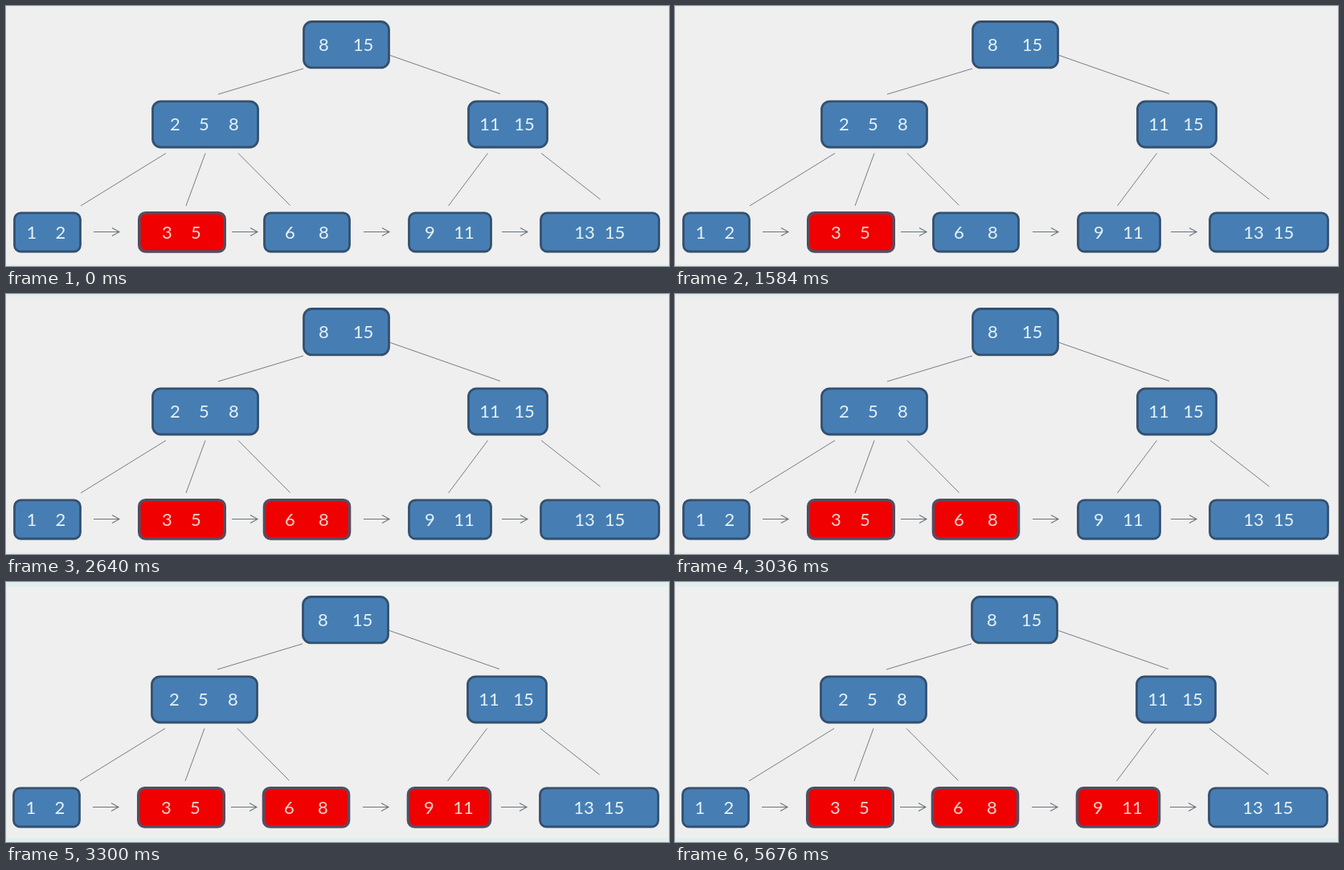
These frames come from a looping animation (825x324 px, 7.26 s). An HTML page:

```html
<!DOCTYPE html>
<html lang="en">
<head>
<meta charset="utf-8">
<title>B+ tree range scan</title>
<style>
  html, body { margin: 0; width: 100%; height: 100%; overflow: hidden; background: #e0eeee; }
  svg { display: block; width: 825px; height: 324px; }
  .paper, .tree, .scan2 rect, .scan2 text, .scan3 rect, .scan3 text {
    animation: 7260ms step-end infinite;
  }
  .paper { fill: #efefef; animation-name: paper; }
  .tree { animation-name: drift; }
  .node rect { fill: #467eb4; stroke: #34506f; stroke-width: 2.8px; }
  .node text { fill: #e6f2f5; font: 22px Lato, "Open Sans", sans-serif; text-anchor: middle; }
  .scan1 rect { fill: #f00000; stroke: #554d61; stroke-width: 3.6px; }
  .scan1 text { fill: #f3d6d0; }
  .scan2 rect { animation-name: boxEarly; }
  .scan2 text { animation-name: textEarly; }
  .scan3 rect { animation-name: boxLate; }
  .scan3 text { animation-name: textLate; }
  .links { fill: none; stroke: #757e83; stroke-width: 1px; }
  .arrows { fill: none; stroke: #69757e; stroke-width: 1.1px; }

  /* the scan advances at 2640 ms and 3300 ms */
  @keyframes drift {
    0% { transform: translate(0, 0); }
    36.36% { transform: translate(0, -1px); }
    45.45%, 100% { transform: translate(-1px, -1px); }
  }
  @keyframes paper {
    0% { clip-path: inset(1px 0 2px 0); }
    36.36% { clip-path: inset(3px 0 2px 0); }
    45.45%, 100% { clip-path: inset(6px 1px 5px 1px); }
  }
  @keyframes boxEarly { 36.36%, 100% { fill: #f00000; stroke: #554d61; stroke-width: 3.6px; } }
  @keyframes textEarly { 36.36%, 100% { fill: #f3d6d0; } }
  @keyframes boxLate { 45.45%, 100% { fill: #f00000; stroke: #554d61; stroke-width: 3.6px; } }
  @keyframes textLate { 45.45%, 100% { fill: #f3d6d0; } }
</style>
</head>
<body>
<svg viewBox="0 0 825 324">
  <rect class="paper" width="825" height="324"/>
  <g class="tree">
    <path class="links" d="M370 78L264 110M478 61.5L615 109.5M199 183.5L93 249M248 183.5L224 249M289 183.5L353.5 248.5M599.5 183.5L550.5 249M666 183.5L739.5 241"/>
    <g class="arrows" id="arrows"></g>
    <g id="nodes"></g>
  </g>
</svg>
<script>
  const make = (parent, name, attrs, text = "") => {
    const el = document.createElementNS("http://www.w3.org/2000/svg", name);
    for (const key in attrs) el.setAttribute(key, attrs[key]);
    el.textContent = text;
    return parent.appendChild(el);
  };

  const rows = {
    root: { y: 19.5, height: 57.4, baseline: 56 },
    inner: { y: 118.8, height: 57.2, baseline: 155 },
    leaf: { y: 257.8, height: 48.2, baseline: 290 }
  };

  // keys map each label to its centre
  const addNode = (row, left, right, keys, scan = "") => {
    const { y, height, baseline } = rows[row];
    const node = make(document.getElementById("nodes"), "g", { class: `node ${scan}` });
    make(node, "rect", { x: left, y, width: right - left, height, rx: row === "leaf" ? 8 : 10 });
    for (const [label, x] of keys) make(node, "text", { x, y: baseline }, label);
  };

  addNode("root", 370.5, 476.5, [["8", 395.5], ["15", 444.5]]);
  addNode("inner", 182.5, 313.5, [["2", 210.5], ["5", 246.5], ["8", 283.5]]);
  addNode("inner", 575.5, 673.5, [["11", 602], ["15", 645]]);
  addNode("leaf", 10.5, 92.5, [["1", 32], ["2", 68]]);
  addNode("leaf", 165.8, 272.2, [["3", 200.5], ["5", 236.5]], "scan1");
  addNode("leaf", 321.5, 427.5, [["6", 353.5], ["8", 395.5]], "scan2");
  addNode("leaf", 501.5, 603.5, [["9", 527.5], ["11", 570]], "scan3");
  addNode("leaf", 665.5, 812.5, [["13", 720], ["15", 757.5]]);

  for (const x of [109, 281, 445, 617])
    make(document.getElementById("arrows"), "path", { d: `M${x} 281.5h32m-9 -5l9 5l-9 5` });
</script>
</body>
</html>
```
